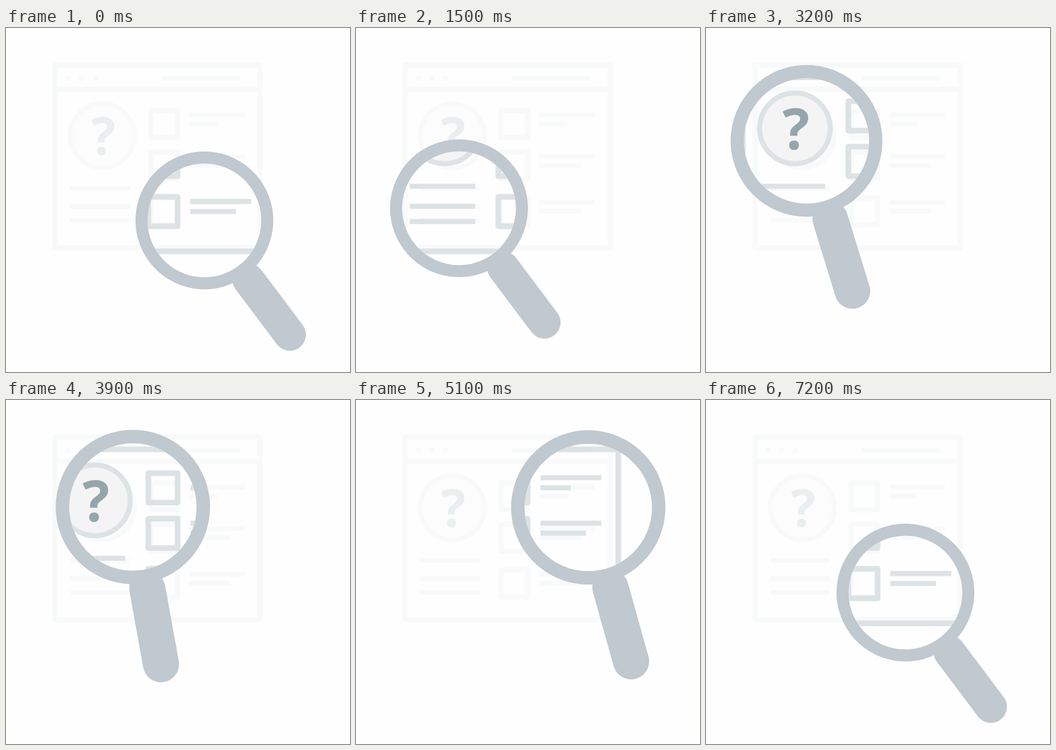
An HTML page that plays this animation: 640 px wide and 640 px high, repeating every 8 s.

```html
<!DOCTYPE html>
<html lang="en">
<head>
<meta charset="utf-8">
<title>Page search</title>
<style>
  html, body { margin: 0; height: 100%; overflow: hidden; background: #fefefe; }
  svg { display: block; width: 100%; height: 100%; }
  text { font: bold 96px "Open Sans", "Noto Sans", sans-serif; text-anchor: middle; }
</style>
</head>
<body>
<svg viewBox="0 0 640 640">
  <defs>
    <g id="page" fill="none" stroke="#dde3e5" stroke-width="9.6">
      <path stroke-linejoin="round" d="M91 69H473V408.7H91Z M91 113.8H473"/>
      <path stroke-linejoin="round" d="M269.7 154.2h49.6v50h-49.6Z m0 77h49.6v50h-49.6Z m0 85h49.6v50h-49.6Z"/>
      <path stroke-width="8.7" d="M111 93.8h9m16 0h9m17 0h9M290 93.8h145
        M341.2 161.8h103m-103 17.3h51.3M341.2 239h103m-103 16.8h77M341.2 324.2h103m-103 17h77
        M119.5 298.5h111m-111 33.8h111m-111 25.8h111"/>
      <circle cx="179.2" cy="200.3" r="59.8" fill="#f4f4f4" stroke-width="8.6"/>
      <text x="181" y="236.3" fill="#95a5ac" stroke="none">?</text>
    </g>
    <clipPath id="glass"><circle id="hole" r="105.8"/></clipPath>
  </defs>
  <use href="#page" opacity=".17"/>
  <g clip-path="url(#glass)">
    <use href="#page" transform="matrix(1.098 0 0 1.098 -31.4 -33.2)"/>
  </g>
  <g id="lens" fill="none" stroke="#c0c8d0">
    <circle r="117" stroke-width="22.4"/>
    <path d="M-.5 138V265.3" stroke-width="60" stroke-linecap="round"/>
  </g>
</svg>
<script>
const LOOP = 8000, STEP = 100;
const lens = document.getElementById("lens");
const hole = document.getElementById("hole");

function pose(t) {
  // Eased progress from 0 to 1 between two times
  const go = (from, to) => {
    const u = Math.min(1, Math.max(0, (t - from) / (to - from)));
    return u * u * (3 - 2 * u);
  };
  const back = go(5350, 7200);

  return {
    // left, a slight drift, right in two sweeps, back
    x: 371 - 179.5 * go(-70, 1080) + 3.5 * go(1400, 2200) - 10 * go(2700, 3400)
      + 110 * go(3400, 4450) + 160 * go(4300, 5350) - 84 * back,
    // dip, sink, climb, sway along the top, back down
    y: 358.5 - 36.5 * go(-70, 950) + 34 * go(900, 2300)
      - 120 * go(2050, 2810) - 34 * go(2550, 3500)
      - 3.5 * go(3600, 4000) + 5.5 * go(4050, 4500) - 5 * go(4450, 4850)
      + 159.5 * go(5000, 7250),
    scale: 1 + 0.12 * (go(2000, 3600) - back),
    tilt: 36.9 - 26.7 * (go(1700, 3950) - go(4280, 7100))
  };
}

function draw(now) {
  const { x, y, scale, tilt } = pose(Math.floor(now % LOOP / STEP) * STEP);
  const place = `translate(${x} ${y}) scale(${scale}) rotate(${-tilt})`;
  lens.setAttribute("transform", place);
  hole.setAttribute("transform", place);
  requestAnimationFrame(draw);
}
draw(performance.now());
</script>
</body>
</html>
```
